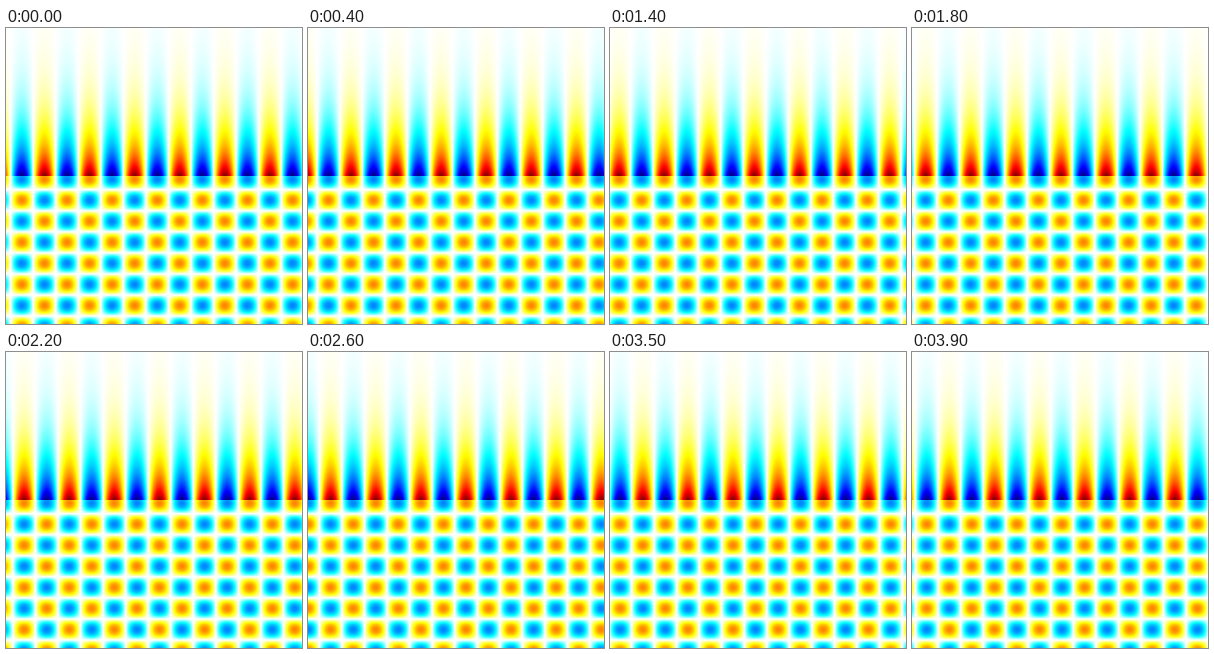
These frames come from a looping animation (400 by 400 pixels, 4000 ms). A matplotlib script:

```python
import numpy as np
import matplotlib.pyplot as plt
from matplotlib.animation import FuncAnimation
from matplotlib.colors import LinearSegmentedColormap

SIZE = 400
FRAMES = 40
INTERFACE = 200          # row where the two media meet

# Wave geometry in pixels
PERIOD_X = 60.95         # along the interface
HALF_Y = 28.45           # between lobes of the standing wave
CREST_X = 52.0           # position of a positive crest at the start
CREST_Y = 204.3          # first lobe below the interface
DECAY = 0.0225           # evanescent decay per pixel
LOWER_AMP = 0.49

field_map = LinearSegmentedColormap.from_list("field", [
    (0.0, (0, 0, 0.5)),
    (0.125, (0, 0, 1)),
    (0.375, (0, 1, 1)),
    (0.5, (1, 1, 1)),
    (0.625, (1, 1, 0)),
    (0.875, (1, 0, 0)),
    (1.0, (0.5, 0, 0)),
], N=1024)

x = np.arange(SIZE) + 0.5
y = np.arange(SIZE) + 0.5

evanescent = np.exp(-DECAY * (INTERFACE - y))
standing = LOWER_AMP * np.cos(np.pi * (y - CREST_Y) / HALF_Y)
profile = np.where(y < INTERFACE, evanescent, standing)


def field(frame):
    phase = 2 * np.pi * ((x - CREST_X) / PERIOD_X - frame / FRAMES)
    return np.outer(profile, np.cos(phase))


fig = plt.figure(figsize=(4, 4), dpi=100)
ax = fig.add_axes([0, 0, 1, 1])
ax.axis("off")
image = ax.imshow(field(0), cmap=field_map, vmin=-1, vmax=1,
                  interpolation="nearest", aspect="auto")


def update(frame):
    image.set_data(field(frame))
    return [image]


anim = FuncAnimation(fig, update, frames=FRAMES, interval=100,
                     blit=False, repeat=True, repeat_delay=0)
plt.show()
```
